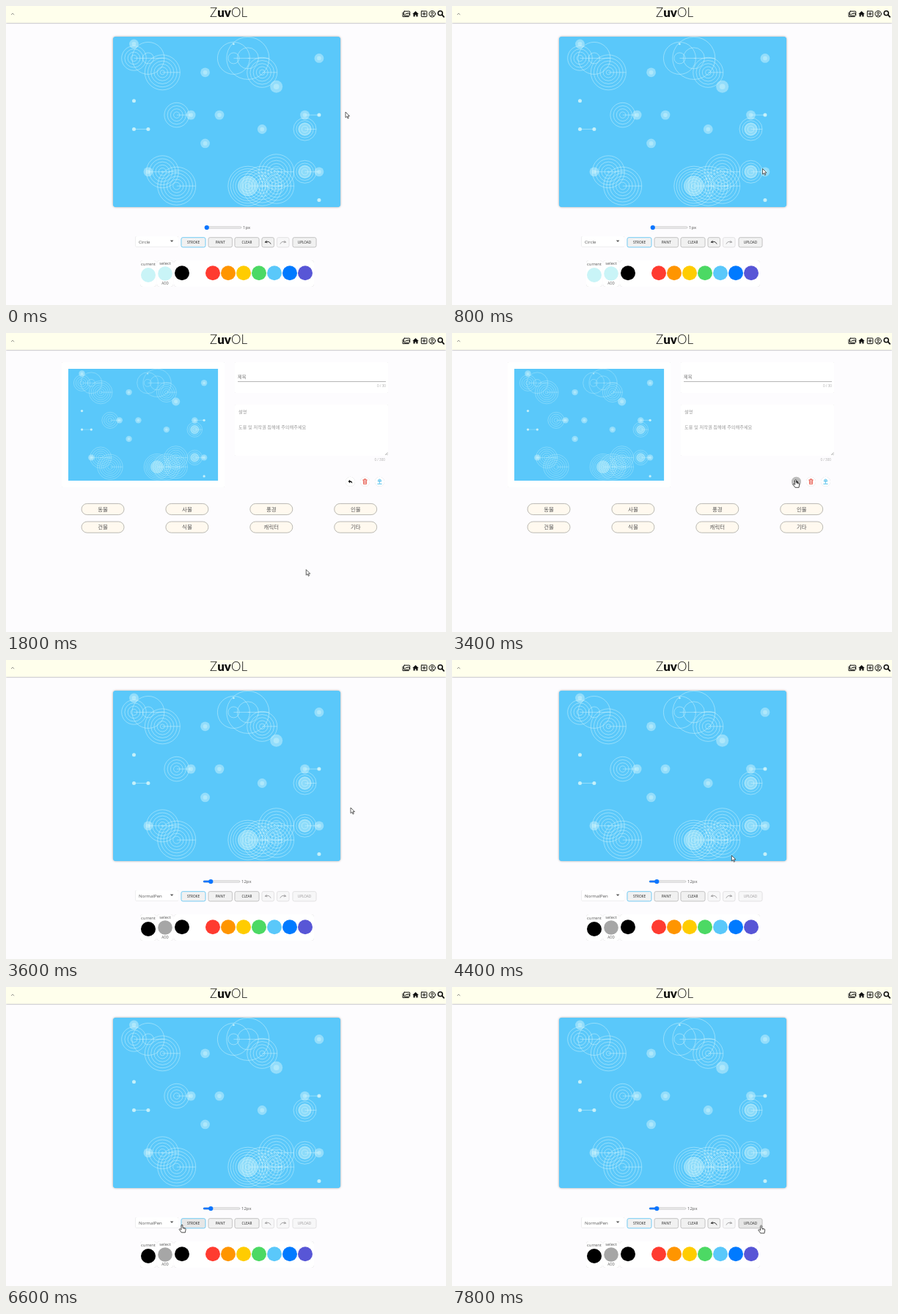
Write an HTML page that moves like this. It is 600 by 409 pixels and loops after 8000 ms.

```html
<!DOCTYPE html>
<html lang="ko">
<head>
<meta charset="utf-8">
<title>Drawing board</title>
<style>
html, body { margin: 0; width: 100%; height: 100%; overflow: hidden; background: #fdfcfe; }
svg { display: block; width: 100%; height: 100%; }
text { font-family: 'Open Sans', 'Noto Sans CJK KR', 'Noto Sans CJK', sans-serif; fill: #555; }
.ko { font-family: 'Noto Sans CJK KR', 'Noto Sans CJK', sans-serif; font-weight: 300; }
.logo { font-family: Lato, sans-serif; font-weight: 300; fill: #111; }
.card { fill: #fff; filter: drop-shadow(0 .9px .7px rgba(0,0,0,.24)); }
.line { fill: none; stroke: #111; stroke-width: 1; stroke-linecap: round; stroke-linejoin: round; }
</style>
</head>
<body>
<svg id="stage" viewBox="0 0 600 409" preserveAspectRatio="none"></svg>
<script>
const LOOP = 8000, STEP = 200;
const SKY = '#5ac8fa', INK = '#d8f7fa', PALE = '#c9f4f7';

const rect = (x, y, w, h, r = 0, attrs = '') =>
  `<rect x="${x}" y="${y}" width="${w}" height="${h}" rx="${r}" ${attrs}/>`;
const circle = (x, y, r, attrs = '') => `<circle cx="${x}" cy="${y}" r="${r}" ${attrs}/>`;
const path = (d, attrs = 'class="line"') => `<path d="${d}" ${attrs}/>`;
const label = (x, y, size, s, attrs = '') => `<text x="${x}" y="${y}" font-size="${size}" ${attrs}>${s}</text>`;
const group = (s, attrs = '') => `<g ${attrs}>${s}</g>`;
const MID = 'text-anchor="middle"';

// Artwork: marks on a square grid, as [column, row, own radius]
const CELL = 19.42;
const kinds = [
  { r: 2.5, fill: .85, cells: [[8, 0, 1.3], [1, 4], [14, 5], [1, 6], [2, 6], [14, 11]] },
  { r: 6.4, fill: .45, core: .45, cells: [[1, 0], [6, 2], [14, 1], [11, 3, 8.5], [5, 5], [7, 5], [13, 5], [6, 7], [2, 9], [14, 9], [10, 6]] },
  { r: 16.8, gap: 4.2, cells: [[1, 1], [4, 5]] },
  { r: 15.5, gap: 3.8, core: .6, cells: [[13, 6], [13, 9]] },
  { r: 24, gap: 4.2, cells: [[3, 2], [10, 2, 20.5], [3, 9, 22], [4, 10, 26], [10, 10, 27], [11, 9], [11, 10]] },
  { r: 27, gap: 3.4, core: .5, cells: [[9, 10]] },
  { r: 22, gap: 14.5, cells: [[2, 1], [8, 1], [9, 1, 29]] }
];

function artwork() {
  const thin = `fill="none" stroke="${INK}" stroke-opacity=".85" stroke-width=".55"`;
  const taken = new Set(kinds.flatMap(kind => kind.cells.map(([i, j]) => i + ',' + j)));
  let s = rect(146, 42, 310, 233, 0, `fill="${SKY}"`);
  for (const { r, fill, gap, core, cells } of kinds)
    for (const [i, j, radius = r] of cells) {
      const x = 155.05 + CELL * i, y = 52 + CELL * j;
      if (fill) s += circle(x, y, radius, `fill="${INK}" fill-opacity="${fill}"`);
      if (core) s += circle(x, y, radius * core, `fill="${INK}" fill-opacity=".4"`);
      for (let ring = radius; gap && ring > 1; ring -= gap) s += circle(x, y, ring, thin);
      // a ray to the rim, or on to the neighbour at the right
      const reach = Math.max(gap ? radius : 0, taken.has(i + 1 + ',' + j) ? CELL : 0);
      s += path(`M${x} ${y}h${reach}`, thin);
    }
  return s;
}

function header() {
  const icons =
    rect(542.5, 7.2, 8.2, 6, .8, 'class="line"') + path('M541 9v5.6h8.2M543.8 12l2-2 1.2 1 1.5-2 1.8 3') +
    path('M558.5 7l-4.2 4h1.2v3.6h2.2v-2.4h1.6v2.4h2.2v-3.6h1.2z', 'fill="#111"') +
    rect(566.3, 7, 7.6, 7.6, .6, 'class="line"') + path('M568 10.8h4.2M570.1 8.7v4.2') +
    circle(581.2, 10.8, 4.2, 'class="line"') + circle(581.2, 9.6, 1.4, 'class="line"') +
    path('M578.6 13.6q2.6-2.6 5.2 0') +
    circle(592.2, 9.8, 3, 'class="line" style="stroke-width:1.6"') +
    path('M594.6 12.2l2.5 2.6', 'class="line" style="stroke-width:1.9"');
  return rect(0, 0, 600, 23, 0, 'fill="#ffffec" style="filter:drop-shadow(0 .9px .8px rgba(0,0,0,.5))"') +
    path('M7.3 11.8l1.8-1.8 1.8 1.8', 'class="line" style="stroke:#666;stroke-width:.7"') +
    label(303.5, 15, 17, 'Z<tspan font-weight="900">uv</tspan>OL', `class="logo" ${MID}`) + icons;
}

const buttons = [ // id, x, width, caption
  ['stroke', 239, 33, 'STROKE'], ['paint', 276, 32.5, 'PAINT'], ['clear', 312, 33, 'CLEAR'],
  ['undo', 349, 16.5], ['redo', 369.5, 16.5], ['upload', 391, 32, 'UPLOAD']
];
const curl = 'M-3.6 -.6l1.6-1.9M-3.6 -.6l2.3 .8M-3.5 -.6q5-2.4 7.2 2.2';

function button([id, x, w, caption]) {
  const mid = x + w / 2;
  const face = caption
    ? label(mid, 325, 4.7, caption, `${MID} style="fill:#222"`)
    : path(curl, `class="line" style="stroke-width:.8" transform="translate(${mid} 323.6) scale(${id === 'redo' ? -1 : 1} 1)"`);
  const edge = id === 'stroke' ? SKY : '#bdbdbd';
  return group(rect(x, 316.7, w, 13.2, 2.2, `id="${id}Face" stroke="${edge}" stroke-width=".8"
    style="filter:drop-shadow(0 .4px .4px rgba(0,0,0,.12))"`) + face, `id="${id}"`);
}

function board() {
  const colors = ['#000', '#fff', '#ff3b30', '#ff9500', '#ffcc00', '#4cd964', SKY, '#007aff', '#5856d6'];
  return rect(146, 42, 310, 233, 4, `fill="${SKY}" style="filter:drop-shadow(0 0 1.6px rgba(0,0,0,.35))"`) +
    group('<use href="#art"/>', 'clip-path="url(#round)"') +
    group(rect(0, 301.8, 50, 2.4, 1.2, 'fill="#efefef" stroke="#aaa" stroke-width=".5"') +
      rect(0, 301.7, 10, 2.6, 1.3, 'id="level" fill="#0a75ff"') +
      circle(0, 303, 3.1, 'id="thumb" fill="#0a75ff"') +
      label(52, 305.2, 6, '', 'id="px"'), 'id="slider"') +
    rect(176.5, 315, 58.5, 14.6, 1.5, 'class="card"') +
    label(181, 324.8, 6, '', 'id="tool"') + path('M223.8 320.6h4.6l-2.3 2.4z', 'fill="#555"') +
    buttons.map(button).join('') +
    rect(183, 348, 22, 36, 4, 'class="card"') + rect(206, 348, 22, 36, 4, 'class="card"') +
    rect(229, 348, 191, 36, 4, 'class="card"') +
    label(194, 355.2, 5.8, 'current', MID) + label(217, 354, 5.8, 'select', MID) + label(217, 381, 4.5, 'ADD', MID) +
    circle(194, 368, 10, 'id="current"') + circle(217, 366, 9.8, 'id="select"') +
    colors.map((c, k) => circle(240 + 21 * k, 365.3, 10, `fill="${c}"`)).join('');
}

function form() {
  const soft = 'class="ko" style="fill:#999"', small = 'text-anchor="end" style="fill:#aaa"';
  const names = ['동물', '사물', '풍경', '인물', '건물', '식물', '캐릭터', '기타'];
  const pills = names.map((name, k) => {
    const x = 132 + 114.9 * (k % 4), y = k < 4 ? 241 : 265.6;
    return rect(x - 29, y - 7.6, 58, 15.2, 7.6, 'fill="#fff9ef" stroke="#97978e" stroke-width=".65"') +
      label(x, y + 2.7, 7.4, name, `class="ko" ${MID}`);
  }).join('');
  return rect(76, 40, 222, 171, 1, 'class="card"') +
    group('<use href="#art"/>', 'transform="translate(84.7 49) scale(.66 .657) translate(-146 -42)" clip-path="url(#square)"') +
    rect(312, 40, 209, 42, 1, 'class="card"') + label(316, 62, 6.2, '제목', 'class="ko" style="fill:#777"') +
    path('M316 66.5h202', 'stroke="#999" stroke-width=".7"') + label(518, 74, 4.6, '0 / 30', small) +
    rect(312, 98, 209, 70, 1, 'class="card"') + label(317, 109.8, 6.2, '설명', soft) +
    label(317, 131, 6.2, '도용 및 저작권 침해에 주의해주세요', soft) +
    path('M517 167l3.5-3.5M519 167l1.5-1.5', 'stroke="#777" stroke-width=".6"') +
    label(517, 175, 4.6, '0 / 300', small) +
    [0, 1, 2].map(k => circle(469.5 + 20 * k, 203.3, 6.5, `class="card" id="round${k}"`)).join('') +
    path('M466.6 203l2.4-2.3v1.5q3.4-.1 3.2 3.6-.9-2-3.2-1.9v1.5z', 'fill="#111"') +
    path('M486.8 201h5.4M488.6 200.8v-1.1h1.8v1.1M487.3 201.2l.3 5.6h3.8l.3-5.6M488.8 202.6v2.8M490.2 202.6v2.8',
      'class="line" style="stroke:#e4483a;stroke-width:.8"') +
    path('M507.4 203q-.2-3 2.1-3 2.3 0 2.1 3M509.5 205.3v-3.4M508.2 203l1.3-1.2 1.3 1.2M506.8 206.5h5.4',
      'class="line" style="stroke:#36b5e8;stroke-width:.8"') + pills;
}

const arrow = path('M0 0v7.6l1.8-1.6 1.3 2.9 1.2-.6-1.3-2.7h2.5z', 'fill="#fff" stroke="#222" stroke-width=".7"');
const hand = path('M-1 .8q1-1.4 1.9 0v3.4l3.2.7q1.2.4 1 1.6l-.7 4.3h-5.2l-3-4.2q.3-1.3 1.5-.6l1.3 1z',
  'fill="#fff" stroke="#222" stroke-width=".8" stroke-linejoin="round"') +
  path('M1.9 4.6v1.6M3.4 5v1.4', 'stroke="#222" stroke-width=".5"');

document.getElementById('stage').innerHTML =
  `<defs><g id="art">${artwork()}</g>
    <clipPath id="round">${rect(146, 42, 310, 233, 4)}</clipPath>
    <clipPath id="square">${rect(146, 42, 310, 233)}</clipPath></defs>` +
  rect(0, 0, 600, 409, 0, 'fill="#fdfcfe"') + header() +
  group(board(), 'id="board"') + group(form(), 'id="form"') +
  group(group(arrow, 'id="arrow"') + group(hand, 'id="hand"'), 'id="pointer"');

const $ = id => document.getElementById(id);
const set = (id, name, value) => $(id).setAttribute(name, value);
const show = (id, on) => set(id, 'display', on ? 'inline' : 'none');

// Turning points of the pointer: ms, x, y
const trail = [
  [0, 463, 145], [400, 449, 118], [1200, 398, 327], [1600, 409, 323.5], [2400, 410, 324],
  [3400, 468.7, 200.5], [3600, 470, 202], [4800, 337, 300], [5400, 306, 314],
  [6200, 221, 332], [6600, 240, 325], [7000, 330, 265], [7600, 397, 313], [7800, 421.6, 326]
];

function pointerAt(t) {
  const next = trail.findIndex(p => p[0] > t);
  if (next < 0) return trail[trail.length - 1].slice(1);
  const [t0, x0, y0] = trail[next - 1], [t1, x1, y1] = trail[next];
  const k = (t - t0) / (t1 - t0);
  return [x0 + (x1 - x0) * k, y0 + (y1 - y0) * k];
}

function draw(ms) {
  const t = Math.floor(ms % LOOP / STEP) * STEP;
  const onForm = t >= 1800 && t < 3600, fresh = t >= 3600, painted = t >= 7200;
  const [x, y] = pointerAt(t);
  const enabled = { undo: !fresh || painted, redo: false, upload: !fresh || painted };
  let over = false;

  show('board', !onForm);
  show('form', onForm);
  for (const [id, left, width] of buttons) {
    const on = enabled[id] !== false;
    const hit = !onForm && on && x >= left && x <= left + width && y >= 316.5 && y <= 330.5;
    over = over || hit;
    set(id, 'opacity', on ? 1 : .45);
    set(id + 'Face', 'fill', hit ? '#e6e6e6' : '#f1f1f1');
  }
  const back = onForm && Math.hypot(x - 469.5, y - 203.3) < 7;
  $('round0').style.fill = back ? '#bdbdbd' : '#fff';
  over = over || back;

  set('slider', 'transform', `translate(${fresh ? 269 : 271} 0)`);
  set('thumb', 'cx', fresh ? 10.3 : 2.8);
  set('level', 'width', fresh ? 10 : 3);
  $('px').textContent = fresh ? '12px' : '1px';
  $('tool').textContent = fresh ? 'NormalPen' : 'Circle';
  set('current', 'fill', fresh ? '#000' : PALE);
  set('select', 'fill', fresh ? '#a6a6a6' : PALE);

  set('pointer', 'transform', `translate(${x} ${y})`);
  show('hand', over);
  show('arrow', !over);
}

const start = performance.now();
function tick() {
  draw(performance.now() - start);
  requestAnimationFrame(tick);
}
tick();
</script>
</body>
</html>
```
